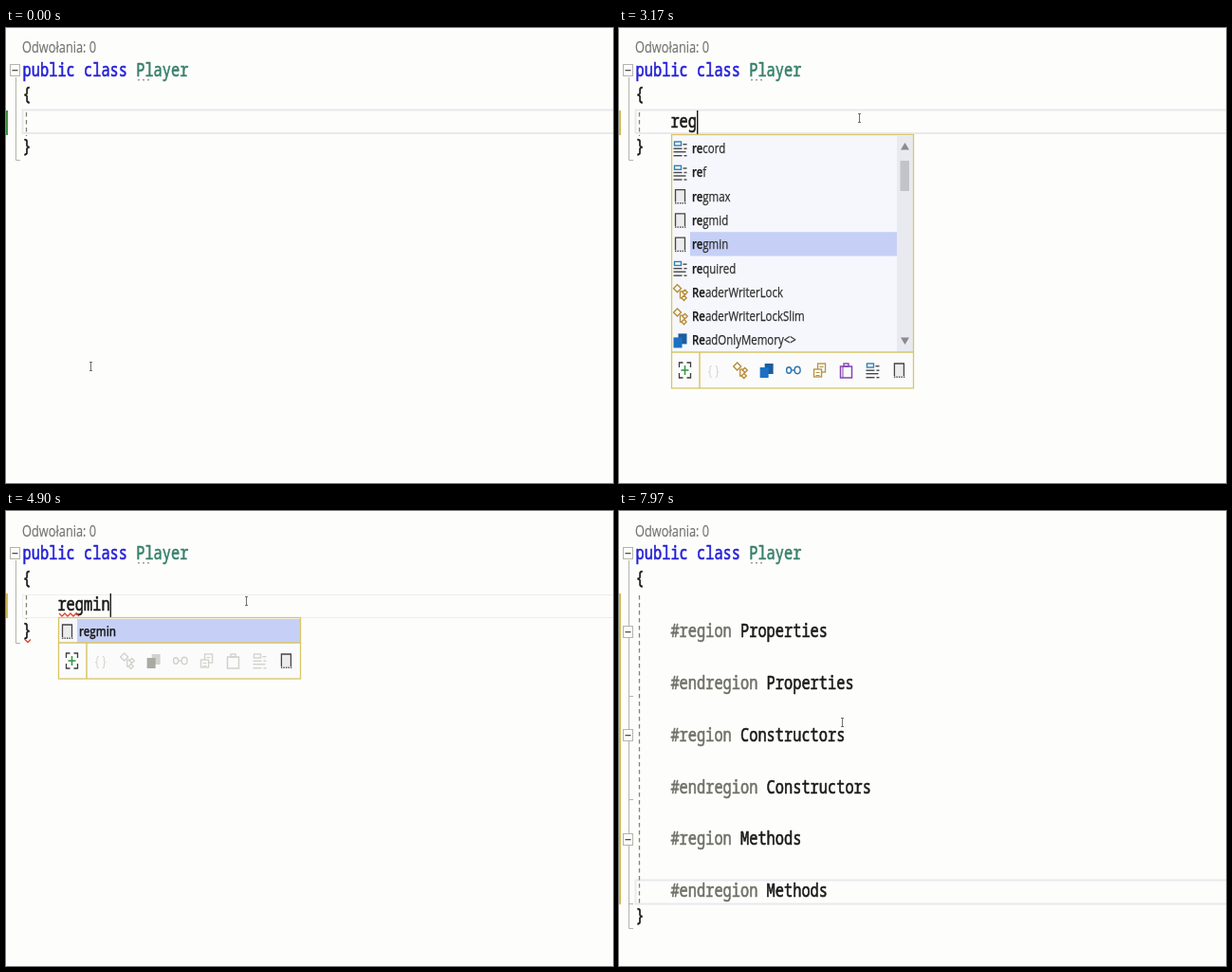
An HTML page with a canvas for the animation above (8 s loop, 640 by 480 pixels).

```html
<!DOCTYPE html>
<html lang="pl">
<head>
<meta charset="utf-8">
<title>Snippet regmin</title>
<style>
  html, body { margin: 0; width: 100%; height: 100%; overflow: hidden; background: #fdfdfb; }
  canvas { display: block; width: 640px; height: 480px; }
</style>
</head>
<body>
<canvas id="stage" width="640" height="480"></canvas>
<script>
const ctx = document.getElementById('stage').getContext('2d');
const LOOP = 8000, SQUEEZE = 0.78, LEFT = 17.6, CHAR = 9.2, LINE = 27.4, TOP = 44.5;
const MONO = '500 19.66px "Noto Sans Mono", monospace';
const UI = '"Open Sans", "Noto Sans", sans-serif';
const PAPER = '#fdfdfb', INK = '#1a1a1a', GREY = '#707068', RULE = '#b4b4ac';
const GOLD = '#d8c668', FAINT = '#d2d2cc', RED = '#e04030';

const TYPED = [[2900, 'r'], [3010, 're'], [3120, 'reg'], [3680, 'regm'], [4350, 'regmi'], [4690, 'regmin']];
const EXPAND = 5700, SHIFT = 4690, PARSED = 6530, FOLDED = 6700;
const POPUPS = [
  { from: 3160, to: 3690, prefix: 2, selected: 4, scroll: true, items: [
    ['keyword', 'record'], ['keyword', 'ref'], ['snippet', 'regmax'], ['snippet', 'regmid'],
    ['snippet', 'regmin'], ['keyword', 'required'], ['type', 'ReaderWriterLock'],
    ['type', 'ReaderWriterLockSlim'], ['struct', 'ReadOnlyMemory<>']] },
  { from: 3690, to: 4740, prefix: 4, selected: 2, items: [
    ['snippet', 'regmax'], ['snippet', 'regmid'], ['snippet', 'regmin']] },
  { from: 4740, to: 5530, prefix: 6, selected: 0, items: [['snippet', 'regmin']] }
];
const MOUSE = [[0, 89, 357], [30, 89, 357], [470, 95, 81], [630, 95, 81], [1430, 253, 95],
  [7000, 253, 95], [7330, 236, 150], [7700, 235, 223], [LOOP, 235, 223]];

function rect(x, y, w, h, color) {
  ctx.fillStyle = color;
  ctx.fillRect(x, y, w, h);
}

function frame(x, y, w, h, color, width = 1) {
  ctx.strokeStyle = color;
  ctx.lineWidth = width;
  ctx.strokeRect(x, y, w, h);
}

function path(points, color, width = 1, close = false) {
  ctx.beginPath();
  for (const [x, y] of points) ctx.lineTo(x, y);
  if (close) ctx.closePath();
  ctx.strokeStyle = color;
  ctx.lineWidth = width;
  ctx.stroke();
}

// Returns the drawn width.
function text(str, x, y, font, color, heavy = 0) {
  ctx.save();
  ctx.translate(x, y);
  ctx.scale(SQUEEZE, 1);
  ctx.font = font;
  ctx.fillStyle = ctx.strokeStyle = color;
  ctx.fillText(str, 0, 0);
  if (heavy) {
    ctx.lineWidth = heavy;
    ctx.lineJoin = 'round';
    ctx.strokeText(str, 0, 0);
  }
  const width = ctx.measureText(str).width * SQUEEZE;
  ctx.restore();
  return width;
}

const code = (str, column, y, color = INK) =>
  text(str, LEFT + column * CHAR, y + 6.5, MONO, color, 0.65);

function squiggle(x, y, width) {
  const points = [];
  for (let i = 0; i * 3 <= width; i++) points.push([x + i * 3, y + (i % 2 ? 1.5 : -1.5)]);
  path(points, RED, 1.3);
}

const icons = {
  expand(x, y) {
    for (const sx of [-1, 1]) for (const sy of [-1, 1])
      path([[x + sx * 6, y + sy * 3], [x + sx * 6, y + sy * 8], [x + sx * 2, y + sy * 8]], '#3c3c3c', 1.3);
    path([[x - 4, y], [x + 4, y]], '#3c9a48', 1.6);
    path([[x, y - 5], [x, y + 5]], '#3c9a48', 1.6);
  },
  braces(x, y, grey) {
    text('{ }', x - 6, y + 5, '15px ' + UI, grey || FAINT);
  },
  type(x, y, grey) {
    const color = grey || '#b88c34';
    const diamond = (cx, cy, r) =>
      path([[cx - r, cy], [cx, cy - r], [cx + r, cy], [cx, cy + r]], color, 1.4, true);
    diamond(x - 3, y - 4, 4);
    diamond(x + 5, y, 2.6);
    diamond(x + 4, y + 6, 2.6);
    path([[x, y - 1], [x + 3, y - 1]], color, 1.3);
    path([[x, y - 1], [x, y + 6], [x + 2, y + 6]], color, 1.3);
  },
  struct(x, y, grey) {
    rect(x - 2, y - 7, 9, 11, grey || '#1c5ca0');
    rect(x - 7, y - 3, 9, 11, grey ? '#aaaaa4' : '#1c70c4');
  },
  interface(x, y, grey) {
    const color = grey || '#2c74b0';
    for (const [dx, r] of [[-4.5, 2.5], [4.5, 3]]) {
      ctx.beginPath();
      ctx.ellipse(x + dx, y, r, r + 0.7, 0, 0, 7);
      ctx.strokeStyle = color;
      ctx.lineWidth = 1.4;
      ctx.stroke();
    }
    path([[x - 2, y], [x + 1.5, y]], color, 1.4);
  },
  enumeration(x, y, grey) {
    const color = grey || '#b49040';
    frame(x - 2, y - 7, 8, 9, color, 1.3);
    rect(x - 6, y - 1, 8, 8, PAPER);
    frame(x - 6, y - 1, 8, 8, color, 1.3);
    for (const [dx, dy] of [[0, -4], [-4, 2], [-4, 5]]) rect(x + dx, y + dy, 4, 1, color);
  },
  namespace(x, y, grey) {
    const color = grey || '#8444b4';
    frame(x - 6, y - 4, 12, 12, color, 1.5);
    frame(x - 2.5, y - 7, 5, 3, color, 1.4);
    if (!grey) path([[x - 3.5, y - 4], [x - 3.5, y + 8]], color, 1);
  },
  keyword(x, y, grey) {
    frame(x - 6, y - 7, 7, 4, grey || '#3480b4', 1.4);
    const color = grey || '#484848';
    rect(x + 3, y - 5, 4, 1.4, color);
    rect(x - 7, y - 0.5, 9, 1.4, color);
    rect(x + 4, y - 0.5, 3, 1.4, color);
    rect(x - 7, y + 3, 13, 1.4, color);
    rect(x - 7, y + 7, 9, 1.4, color);
    rect(x + 4, y + 7, 3, 1.4, color);
  },
  snippet(x, y) {
    rect(x - 5, y - 7, 10, 14, '#ececec');
    path([[x - 5, y + 6], [x - 5, y - 7], [x + 5, y - 7], [x + 5, y + 6]], '#444', 1.3);
    for (let i = -5; i < 6; i += 2.5) rect(x + i - 0.5, y + 6.5, 1.4, 1.4, '#444');
  }
};
const TOOLBAR = ['expand', 'braces', 'type', 'struct', 'interface', 'enumeration', 'namespace', 'keyword', 'snippet'];

function scrollbar(bottom) {
  rect(293, 114, 17, bottom - 114, '#e9eaf0');
  rect(296.5, 140, 9.5, 32, '#c2c3c8');
  for (const [y, dir] of [[125, 1], [330, -1]]) {
    ctx.beginPath();
    ctx.moveTo(301.5, y - 4 * dir);
    ctx.lineTo(306, y + 3.5 * dir);
    ctx.lineTo(297, y + 3.5 * dir);
    ctx.fillStyle = '#8a8a90';
    ctx.fill();
  }
}

function popup({ items, prefix, selected, scroll }) {
  const row = 25.3, bottom = Math.round(114 + row * items.length);
  rect(55, 112.5, 255.5, bottom - 112.5, '#f6f7fc');
  rect(55, bottom, 255.5, 38, '#fbfbfb');
  rect(75, 114 + row * selected, scroll ? 218 : 235, row, '#c6d0f6');
  if (scroll) scrollbar(bottom);
  items.forEach(([kind, name], i) => {
    const y = 127 + row * i;
    icons[kind](64.5, y);
    const width = text(name.slice(0, prefix), 77, y + 5, '600 14.7px ' + UI, INK, 0.25);
    text(name.slice(prefix), 77 + width, y + 5, '14.7px ' + UI, '#2c2c2c', 0.25);
  });
  frame(55.5, 112.5, 255, bottom + 38 - 112.5, GOLD, 1.3);
  path([[55, bottom], [311, bottom]], GOLD, 1.5);
  path([[85, bottom], [85, bottom + 38]], GOLD, 1.5);
  TOOLBAR.forEach((kind, i) => {
    const x = i ? 71.8 + i * 27.95 : 69.5;
    icons[kind](x, bottom + 19, scroll ? null : FAINT);
  });
}

function foldBox(y) {
  rect(4, y - 6, 11, 12, PAPER);
  frame(4.5, y - 5.5, 10, 12, RULE);
  rect(6.5, y, 6, 1.3, '#505050');
}

function currentLine(y, bottom, color, width) {
  frame(17.5, y, 640, bottom - y, color, width);
}

function indentGuide(from, to) {
  ctx.setLineDash([4.5, 3.5]);
  path([[21.5, from], [21.5, to]], '#84846c', 1.3);
  ctx.setLineDash([]);
}

function caret(column, y, t, since) {
  const on = Math.floor(Math.max(0, t - since) / 530) % 2 === 0;
  if (on) rect(LEFT + column * CHAR, y - 12, 1.4, 25, INK);
}

function regions(t) {
  ['Properties', 'Constructors', 'Methods'].forEach((name, i) => {
    const y = TOP + LINE * (3 + 4 * i);
    code('#region', 4, y, GREY);
    code(name, 12, y);
    code('#endregion', 4, y + 2 * LINE, GREY);
    code(name, 11, y + 2 * LINE - 0);
  });
}

function foldMarks() {
  for (let i = 0; i < 3; i++) {
    const y = TOP + LINE * (3 + 4 * i);
    foldBox(Math.round(y));
    rect(10, Math.round(y + 2 * LINE + 13), 5, 1, RULE);
  }
}

regions = function (t) {
  ['Properties', 'Constructors', 'Methods'].forEach((name, i) => {
    const y = TOP + LINE * (3 + 4 * i);
    code('#region', 4, y, GREY);
    code(name, 12, y);
    code('#endregion', 4, y + 2 * LINE, GREY);
    code(name, 15, y + 2 * LINE);
  });
  if (t >= FOLDED) foldMarks();
  if (t < PARSED) {
    squiggle(221, 412, 10);
    squiggle(20, 440, 8);
  }
  caret(22.1, 401, t, 5900);
};

function typing(t) {
  const last = TYPED.filter(([at]) => at <= t).pop();
  if (!last) return;
  const [since, word] = last;
  code(word, 4, 98.5);
  if (word.length > 3) squiggle(56, 109.5, 22);
  caret(4 + word.length, 99, t, since);
  if (t >= SHIFT) squiggle(20, 137, 8);
  const list = POPUPS.find(p => t >= p.from && t < p.to);
  if (list) popup(list);
  if (t >= 4370 && t < 4450) frame(311.5, 164.5, 7, 9, '#c8c8c0');
}

function pointer(t) {
  const next = Math.max(1, MOUSE.findIndex(([at]) => at > t));
  const [t0, x0, y0] = MOUSE[next - 1], [t1, x1, y1] = MOUSE[next];
  const p = (t - t0) / (t1 - t0), eased = p * p * (3 - 2 * p);
  const x = Math.round(x0 + (x1 - x0) * eased), y = Math.round(y0 + (y1 - y0) * eased);
  rect(x, y - 4, 1, 9, '#707070');
  rect(x - 1, y - 5, 3, 1, '#707070');
  rect(x - 1, y + 4, 3, 1, '#707070');
}

function draw(t) {
  const expanded = t >= EXPAND, shifted = t >= SHIFT, edited = t >= TYPED[0][0];
  const drop = shifted ? 0 : -1.5;
  const end = expanded ? TOP + LINE * 14 - 1.5 : 125.5 + drop;
  rect(0, 0, 640, 480, PAPER);

  if (expanded) currentLine(389.5, 414.5, '#e9e9ee', 2);
  else if (shifted) currentLine(88.5, 112.5, '#ededf0', 1);
  else currentLine(86.5, 111, '#e9e9ee', 2);

  rect(0, 87, 2, expanded ? 328 : 26, edited ? '#d2bc58' : '#3c9040');
  const foot = expanded ? 441 : 140;
  path([[10.5, 52], [10.5, foot - 0.5], [15, foot - 0.5]], RULE);
  foldBox(44);
  indentGuide(89, expanded ? 414 : 114);

  text('Odwołania: 0', 17, 27 + drop, '16.4px ' + UI, '#747470', 0.2);
  code('public class', 0, TOP, '#2420d8');
  code('Player', 13, TOP, '#38806c');
  for (const x of [139, 144, 149]) rect(x, 54, 2, 1.5, '#98a090');
  code('{', 0, 70.8 + drop);
  code('}', 0, end);

  if (expanded) regions(t);
  else typing(t);
  pointer(t);
}

const start = performance.now();
function tick() {
  draw((performance.now() - start) % LOOP);
  requestAnimationFrame(tick);
}
tick();
</script>
</body>
</html>
```
